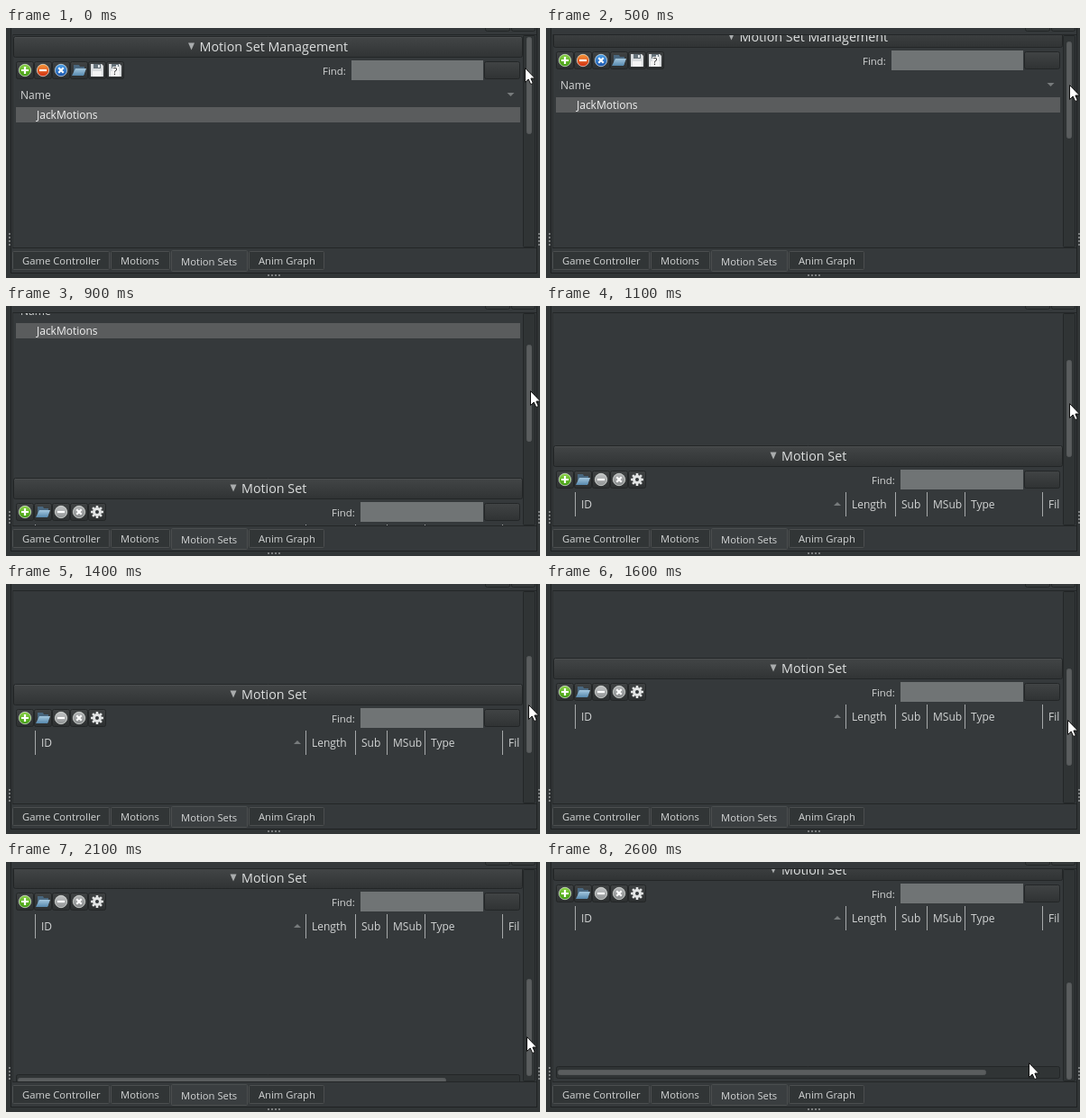
Write an HTML page with a canvas that moves like this. It is 592 px wide and 278 px high and loops after 2700 ms.

```html
<!DOCTYPE html>
<html lang="en">
<head>
<meta charset="utf-8">
<title>Motion Sets</title>
<style>
html, body { margin: 0; width: 100%; height: 100%; overflow: hidden; background: #35393b; }
canvas { display: block; }
</style>
</head>
<body>
<canvas id="stage" width="592" height="278"></canvas>
<script>
const ctx = document.getElementById('stage').getContext('2d');
const LOOP = 2700, STEP = 100, VIEW = { x: 8, y: 8, w: 565, h: 236 };
const BG = '#35393b', EDGE = '#232627', TEXT = '#d3d5d5';

// [time, value...] keys, linear in between
const scrollKeys = [[0, 0], [300, 0], [400, 4], [500, 11], [700, 32], [900, 69], [1100, 105],
  [1600, 178], [1900, 223], [2100, 254], [2200, 263]];
const cursorKeys = [[0, 575, 44], [100, 580, 46], [300, 580, 46], [400, 580, 54], [700, 581, 80],
  [1100, 580, 108], [1600, 578, 151], [1900, 577, 170], [2100, 577, 194], [2200, 577, 201],
  [2400, 577, 206], [2500, 577, 206], [2600, 535, 223]];

function at(keys, t) {
  let i = keys.length - 1;
  while (keys[i][0] > t) i--;
  const a = keys[i], b = keys[i + 1];
  if (!b) return a.slice(1);
  const k = (t - a[0]) / (b[0] - a[0]);
  return a.slice(1).map((v, n) => Math.round(v + (b[n + 1] - v) * k));
}

function rect(x, y, w, h, fill) {
  ctx.fillStyle = fill;
  ctx.fillRect(x, y, w, h);
}

function gradient(y, h, top, bottom) {
  const g = ctx.createLinearGradient(0, y, 0, y + h);
  g.addColorStop(0, top);
  g.addColorStop(1, bottom);
  return g;
}

function box(x, y, w, h, fill, stroke = EDGE, r = 2) {
  ctx.beginPath();
  ctx.roundRect(x + 0.5, y + 0.5, w - 1, h - 1, r);
  ctx.fillStyle = fill;
  ctx.fill();
  ctx.strokeStyle = stroke;
  ctx.lineWidth = 1;
  ctx.stroke();
}

function text(s, x, y, size, color = TEXT) {
  ctx.font = `${size}px "Open Sans", sans-serif`;
  ctx.fillStyle = color;
  ctx.fillText(s, x, y);
}

function poly(points, fill) {
  ctx.beginPath();
  points.forEach(([x, y]) => ctx.lineTo(x, y));
  ctx.closePath();
  ctx.fillStyle = fill;
  ctx.fill();
}

function triangle(x, y, w, h, fill) {
  poly([[x - w / 2, y - h / 2], [x + w / 2, y - h / 2], [x, y + h / 2]], fill);
}

function header(title, x, y) {
  box(8, y, 565, 24, gradient(y, 24, '#434647', '#303334'));
  rect(10, y + 1, 561, 1, '#4b4e4f');
  triangle(x - 9, y + 11.5, 7, 8, '#a9acad');
  text(title, x, y + 16.5, 14.3, '#dddfdf');
}

function findBar(labelX, fieldX, y) {
  text('Find:', labelX, y + 16, 11.4);
  rect(fieldX, y, 529 - fieldX, 22, '#707475');
  box(530, y + 1, 40, 20, gradient(y, 20, '#424546', '#303334'));
}

function strokes(color, width, ...lines) {
  ctx.strokeStyle = color;
  ctx.lineWidth = width;
  ctx.beginPath();
  for (const [x1, y1, x2, y2] of lines) {
    ctx.moveTo(x1, y1);
    ctx.lineTo(x2, y2);
  }
  ctx.stroke();
}

function badge(light, dark, ...lines) {
  const g = ctx.createLinearGradient(0, -7, 0, 7);
  g.addColorStop(0, light);
  g.addColorStop(1, dark);
  ctx.beginPath();
  ctx.arc(0, 0, 6.7, 0, Math.PI * 2);
  ctx.fillStyle = g;
  ctx.fill();
  ctx.strokeStyle = 'rgba(235,240,235,.65)';
  ctx.lineWidth = 1;
  ctx.stroke();
  strokes('#fff', 2.2, ...lines);
}

const H = [-4, 0, 4, 0], V = [0, -4, 0, 4], X = [[-2.7, -2.7, 2.7, 2.7], [-2.7, 2.7, 2.7, -2.7]];

function disk() {
  poly([[-7, -7], [5, -7], [7, -5], [7, 7], [-7, 7]], '#d9dcde');
  rect(-4, -7, 8, 5, '#66727a');
  rect(1, -6, 2, 3, '#e8eaeb');
  rect(-5, 1, 10, 6, '#f4f4f4');
}

const icons = {
  add: () => badge('#8ed44a', '#3f9a10', H, V),
  remove: () => badge('#f79a3a', '#d02a10', H),
  clear: () => badge('#4fa2e8', '#1650a8', ...X),
  removeOff: () => badge('#c2c4c5', '#8f9293', H),
  clearOff: () => badge('#b4b6b7', '#858889', ...X),
  folder() {
    poly([[-6, -6], [0, -6], [1, -4], [6, -4], [6, 5], [-6, 5]], '#49677f');
    poly([[-4, -2], [8, -2], [5, 6], [-8, 6]], gradient(-2, 8, '#a5c8df', '#5688ad'));
  },
  save: disk,
  saveAs() {
    disk();
    rect(-3, -4, 7, 10, '#f4f4f4');
    text('?', -2.5, 5, 11, '#222');
  },
  gear() {
    for (let i = 0; i < 4; i++) {
      const a = i * Math.PI / 4, c = Math.cos(a) * 7, s = Math.sin(a) * 7;
      strokes('#e2e4e4', 2.6, [-c, -s, c, s]);
    }
    ctx.beginPath();
    ctx.arc(0, 0, 5, 0, Math.PI * 2);
    ctx.fillStyle = '#e2e4e4';
    ctx.fill();
    ctx.beginPath();
    ctx.arc(0, 0, 2, 0, Math.PI * 2);
    ctx.fillStyle = '#35393b';
    ctx.fill();
  }
};

function toolbar(names, y) {
  names.forEach((name, i) => {
    const x = 21 + i * 20;
    box(x - 10, y - 10, 20, 20, gradient(y - 10, 20, '#404344', '#2c2f30'));
    ctx.save();
    ctx.translate(x, y);
    icons[name]();
    ctx.restore();
  });
}

function content() {
  header('Motion Set Management', 214.5, 9);
  toolbar(['add', 'remove', 'clear', 'folder', 'save', 'saveAs'], 47);
  findBar(351, 383, 36);
  text('Name', 16, 79, 12);
  triangle(559.5, 74, 8, 4, '#777b7c');
  rect(11, 88, 559, 17, '#5a5c5d');
  text('JackMotions', 34, 101, 12, '#f1f1f1');

  header('Motion Set', 261, 260);
  toolbar(['add', 'folder', 'removeOff', 'clearOff', 'gear'], 298);
  findBar(361, 393, 287);
  ctx.save();
  ctx.beginPath();
  ctx.rect(10, 310, 559, 40);
  ctx.clip();
  [['ID', 32], ['Length', 332], ['Sub', 387], ['MSub', 422], ['Type', 464], ['File', 550]]
    .forEach(([name, x]) => {
      rect(x, 312, 1, 27, '#a6a9aa');
      text(name, x + 7, 330, 12);
    });
  ctx.restore();
  triangle(323, 325, 8, -4, '#777b7c');
  box(11, 490, 559, 14, '#303435');
  box(13, 494, 475, 6, '#5a5d5e', '#555859', 2);
}

function dots(x, y, dx, dy) {
  for (let i = 0; i < 4; i++) rect(x + dx * i, y + dy * i, 2, 2, '#7b7e7f');
}

function tab(name, x, w, active) {
  const y = active ? 247 : 248, h = active ? 24 : 21;
  box(x, y, w, h, active ? '#3a3e40' : '#313536', '#4b4e4f', 1);
  text(name, x + 11, active ? 264 : 263, 11.25);
}

function frame() {
  rect(0, 0, 592, 278, '#313536');
  rect(6, 0, 582, 272, BG);
  rect(5, 0, 1, 273, '#1f2223');
  rect(588, 0, 1, 273, '#1f2223');
  rect(5, 272, 584, 1, '#1f2223');
  box(531, -16, 28, 20, '#35393a');
  box(560, -16, 27, 20, '#35393a');
  rect(7, 7, 581, 1, EDGE);
  rect(7, 7, 1, 238, '#2b2e2f');
  rect(7, 244, 581, 1, EDGE);
  tab('Game Controller', 7, 108);
  tab('Motions', 116, 66);
  tab('Motion Sets', 183, 85, true);
  tab('Anim Graph', 269, 84);
  dots(3, 228, 0, 4);
  dots(590, 228, 0, 4);
  dots(290, 274, 4, 0);
}

function cursor(x, y) {
  ctx.save();
  ctx.translate(x + 0.5, y + 0.5);
  ctx.lineJoin = 'miter';
  poly([[0, 0], [0, 16], [3.7, 12.5], [6.2, 18], [8.8, 17], [6.4, 11.5], [11, 11.5]], '#fff');
  ctx.strokeStyle = '#111';
  ctx.lineWidth = 1;
  ctx.stroke();
  ctx.restore();
}

function draw(t) {
  const [scroll] = at(scrollKeys, t);
  frame();
  ctx.save();
  ctx.beginPath();
  ctx.rect(VIEW.x, VIEW.y, VIEW.w, VIEW.h);
  ctx.clip();
  ctx.translate(0, -scroll);
  content();
  ctx.restore();
  box(573, 8, 14, 236, '#303435', EDGE, 1);
  box(577, 10 + Math.round(scroll * 0.472), 6, 108, '#5a5d5e', '#555859', 2);
  cursor(...at(cursorKeys, t));
}

function tick(now) {
  draw(Math.floor((now % LOOP) / STEP) * STEP);
  requestAnimationFrame(tick);
}
tick(performance.now());
</script>
</body>
</html>
```
